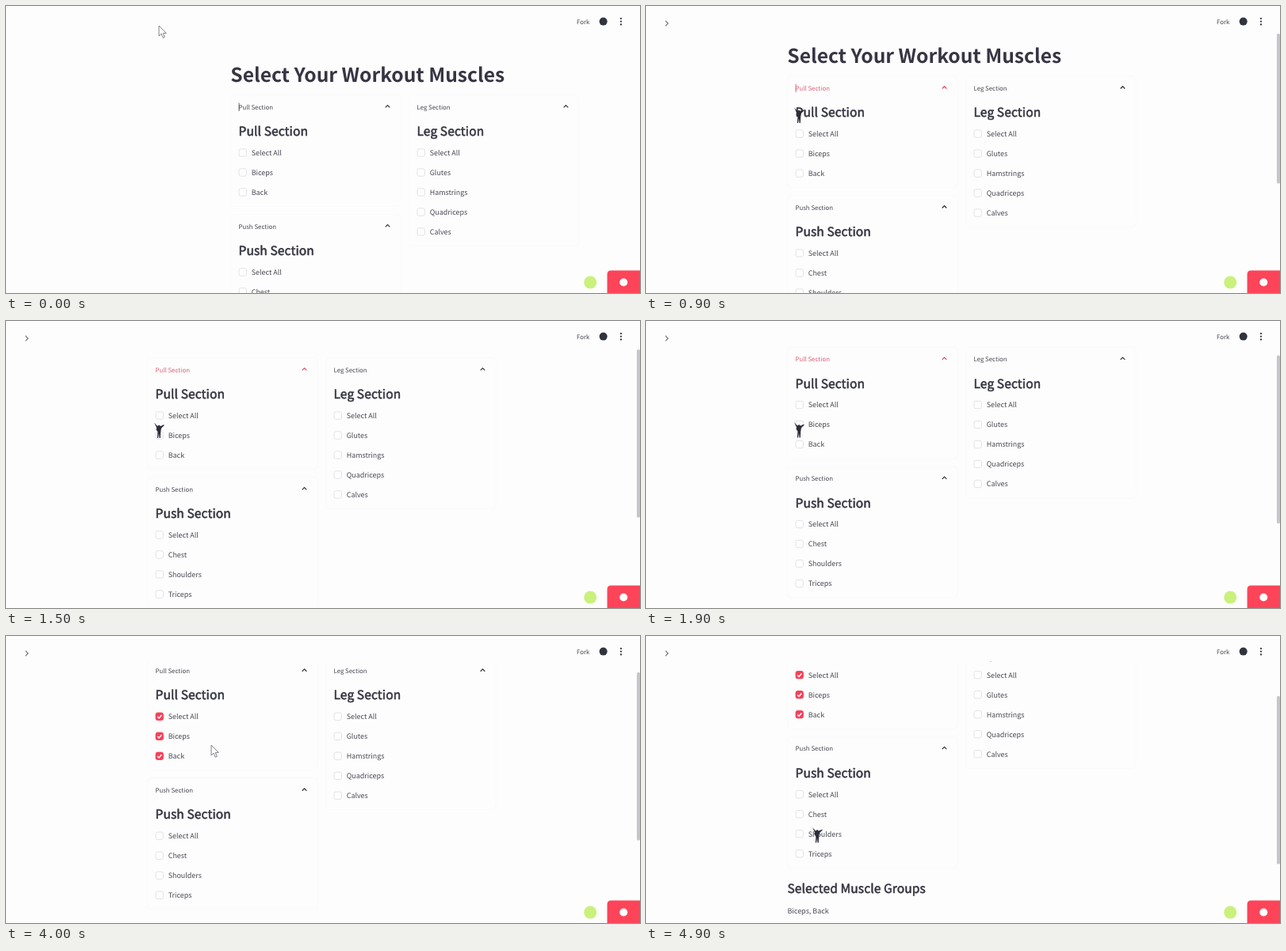
Animation, 800 px wide and 363 px high, one loop 5 s. Source, as an HTML page:

```html
<!DOCTYPE html>
<html lang="en">
<head>
<meta charset="utf-8">
<title>Workout muscles</title>
<style>
  html, body { margin: 0; width: 100%; height: 100%; overflow: hidden; background: #fdfdfd; }
  svg { display: block; width: 800px; height: 363px; }
  text {
    font-family: "Noto Sans CJK JP", "Noto Sans CJK SC", "Noto Sans", sans-serif;
    fill: #484953; text-rendering: geometricPrecision; white-space: pre;
  }
  .title { font-size: 24.6px; font-weight: 700; letter-spacing: -.015px; fill: #363543; }
  /* Regular with a thin outline stands in for semibold */
  .head {
    font-size: 15.5px; letter-spacing: .13px; fill: #33343f;
    stroke: #33343f; stroke-width: .55; stroke-linejoin: round;
  }
  .body { font-size: 8.95px; }
  .small { font-size: 7.83px; }
  .card { fill: none; stroke: #fafafa; }
  .arrow { fill: none; stroke: #31333f; stroke-width: 1.25; }
  .box { fill: #fefefe; stroke: #dfe0e3; stroke-width: .9; }
  .tick { fill: none; stroke: #fff; stroke-width: 1.5; visibility: hidden; }
  .on .box { fill: #f8405a; stroke: #f8405a; }
  .on .tick { visibility: visible; }
  .hot text { fill: #d9607a; }
  .hot .arrow { stroke: #e04a66; }
</style>
</head>
<body>
<svg id="stage" viewBox="0 0 800 363"></svg>
<script>
const LOOP = 5000, STEP = 100;
const BG = '#fdfdfd', INK = '#31333f';
const stage = document.getElementById('stage');

function add(parent, tag, attrs = {}, label) {
  const el = document.createElementNS('http://www.w3.org/2000/svg', tag);
  for (const key in attrs) el.setAttribute(key, attrs[key]);
  if (label) el.textContent = label;
  parent.appendChild(el);
  return el;
}
const write = (parent, x, y, cls, label) => add(parent, 'text', { x, y, class: cls }, label);

function checkbox(parent, x, y, label) {
  const g = add(parent, 'g');
  add(g, 'rect', { x: x + .5, y: y - 4.7, width: 9.4, height: 9.4, rx: 2.2, class: 'box' });
  add(g, 'path', { d: `M${x + 2.6} ${y + .2}l1.9 2 3.4-4`, class: 'tick' });
  write(g, x + 16.2, y + 3.4, 'body', label);
  return g;
}

// A card whose top edge is at y, with one checkbox per item
function section(parent, x, y, name, items) {
  const g = add(parent, 'g');
  add(g, 'rect', { x, y, width: 214.5, height: 66 + items.length * 25, rx: 5, class: 'card' });
  const bar = add(g, 'g');
  write(bar, x + 10, y + 18, 'small', name);
  add(bar, 'path', { d: `M${x + 195.2} ${y + 15.9}l2.8-2.8 2.8 2.8`, class: 'arrow' });
  write(g, x + 10, y + 51.5, 'head', name);
  const boxes = items.map((item, i) => checkbox(g, x + 10, y + 73 + i * 25, item));
  return { bar, boxes };
}

// Scrolling page
const page = add(stage, 'g');
write(page, 178.3, 96, 'title', 'Select Your Workout Muscles');
const pull = section(page, 178.5, 112.5, 'Pull Section', ['Select All', 'Biceps', 'Back']);
section(page, 178.5, 263.5, 'Push Section', ['Select All', 'Chest', 'Shoulders', 'Triceps']);
section(page, 403.5, 112.5, 'Leg Section', ['Select All', 'Glutes', 'Hamstrings', 'Quadriceps', 'Calves']);
const caret = add(page, 'rect', { x: 188.6, y: 122.5, width: .9, height: 10.5, fill: '#555' });
const result = add(page, 'g');
write(result, 178.5, 461.5, 'head', 'Selected Muscle Groups');
write(result, 178.5, 487.7, 'body', 'Biceps, Back');

// Fixed parts
add(stage, 'rect', { width: 800, height: 32, fill: BG });
const opener = add(stage, 'path', { d: 'M24.6 18.6l3.2 3.4-3.2 3.4', fill: 'none', stroke: '#74757d', 'stroke-width': 1.2 });
write(stage, 720, 22.7, 'small', 'Fork');
add(stage, 'circle', { cx: 753.7, cy: 19.6, r: 5, fill: INK });
for (const cy of [15.8, 19.6, 23.4]) add(stage, 'circle', { cx: 776, cy, r: 1.15, fill: INK });
const thumb = add(stage, 'rect', { x: 796, width: 4, rx: 1.5, fill: '#c5c6c9' });
add(stage, 'circle', { cx: 737.3, cy: 349.5, r: 8, fill: '#c9f17c' });
add(stage, 'path', { d: 'M758.6 363V339.6q0-5 5-5H800V363Z', fill: '#fd4459' });
add(stage, 'circle', { cx: 779.3, cy: 349.5, r: 5, fill: '#fff' });

// Pointers
const pointer = add(stage, 'g');
const plain = add(pointer, 'path', {
  d: 'M0 0V13L3 10 5.2 15.3 7.3 14.3 5.2 9.4H9.2Z', fill: '#fff', stroke: '#74747c', 'stroke-width': .9
});
const figure = add(pointer, 'path', {
  d: 'M-6-1L-2 3.5 0 2 2 3.5 6.5 1.5 6.5 2.7 3 6 2.2 10.5 1.8 18.5H.5L0 12.5-1 18.5H-2.2L-1.6 10.5-3.5 8-3 5.5Z',
  fill: '#2c2c3a'
});

// Rows: time, value...
const scrollKeys = [[600, 0], [800, 14], [1100, 43.7], [1500, 66], [1900, 79.5], [2100, 83.7], [4100, 83.7], [4400, 108], [4700, 130], [4900, 136.3]];
const pointerKeys = [[300, 193, 25], [600, 193, 129], [1100, 193, 130], [1900, 193, 129], [2300, 193, 129],
  [2800, 217, 121], [3200, 196, 98], [3400, 196, 98], [3900, 259, 138], [4000, 259, 138], [4700, 216, 243]];

function at(keys, t, col = 1) {
  const i = keys.findIndex(k => k[0] > t);
  if (i === 0) return keys[0][col];
  if (i < 0) return keys[keys.length - 1][col];
  const a = keys[i - 1], b = keys[i];
  return a[col] + (b[col] - a[col]) * (t - a[0]) / (b[0] - a[0]);
}
const show = (el, on) => el.setAttribute('visibility', on ? 'visible' : 'hidden');

function draw(t) {
  const scroll = at(scrollKeys, t);
  page.setAttribute('transform', `translate(${t < 100 ? 105 : 0} ${-scroll})`);
  show(opener, t >= 100);
  show(caret, t < 1300);
  caret.setAttribute('fill', t >= 600 ? '#d9607a' : '#555');
  pull.bar.classList.toggle('hot', t >= 600 && t < 2400);

  const top = 46 + .57 * (scroll - 83.7), y = Math.max(35, top);
  show(thumb, scroll > 0);
  thumb.setAttribute('y', y);
  thumb.setAttribute('height', top + 212.5 - y);

  pull.boxes.forEach((box, i) => box.classList.toggle('on', t >= (i ? 3600 : 3400)));
  show(result, t >= 3600);

  const over = t >= 600 && t < 3600 || t >= 4600;
  show(figure, over);
  show(plain, !over);
  pointer.setAttribute('transform', `translate(${at(pointerKeys, t, 1)} ${at(pointerKeys, t, 2)})`);
}

const start = performance.now();
function tick() {
  const t = (performance.now() - start) % LOOP;
  draw(Math.floor(t / STEP) * STEP);
  requestAnimationFrame(tick);
}
tick();
</script>
</body>
</html>
```
